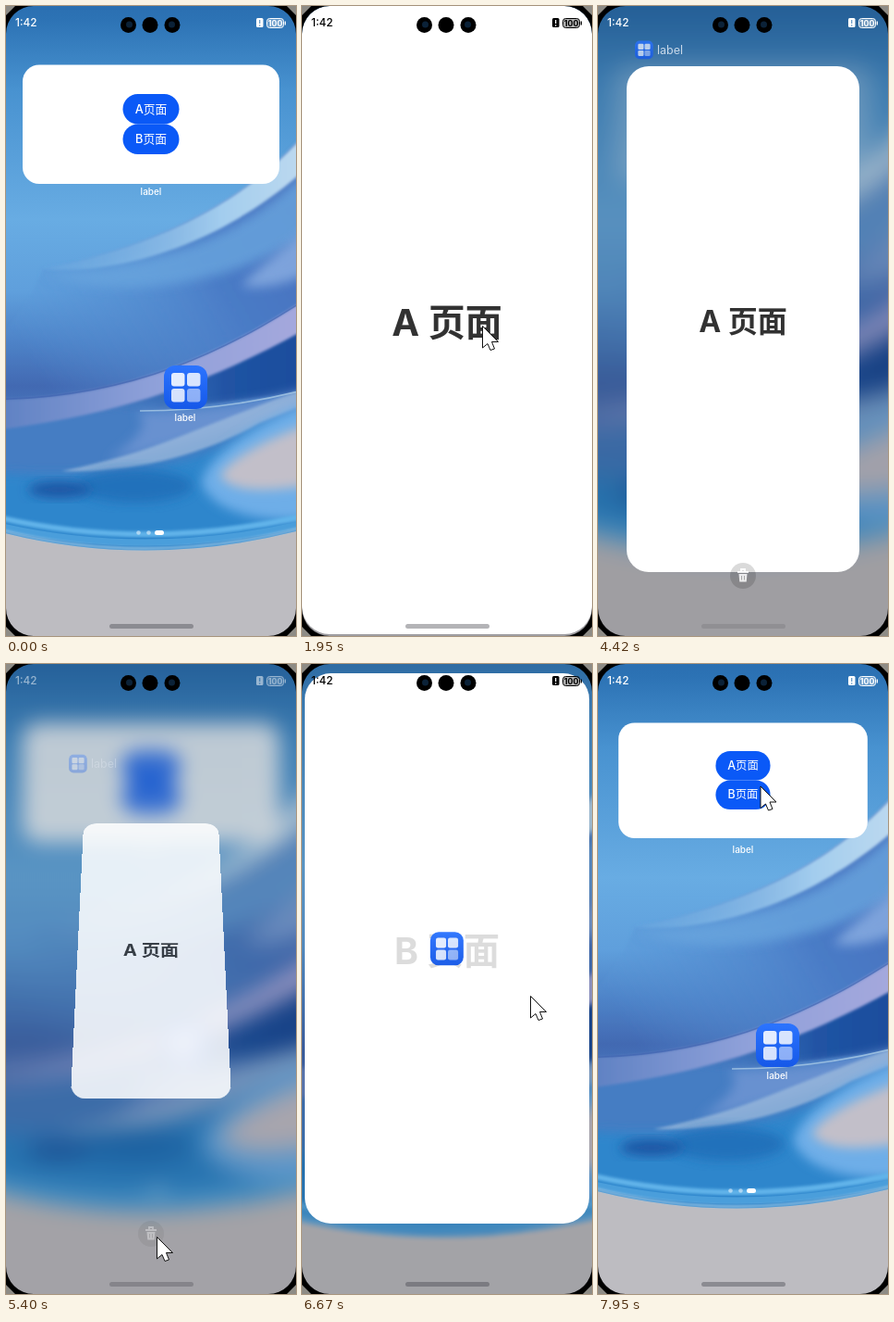
Animation of 314 by 680 pixels, one loop 8000 ms. Source, as an HTML page:

```html
<!DOCTYPE html>
<html lang="zh">
<head>
<meta charset="utf-8">
<title>Widget launch</title>
<style>
html, body { margin: 0; width: 100%; height: 100%; overflow: hidden; background: #bdbcc1; }
#stage { position: relative; width: 314px; height: 680px; overflow: hidden; }
svg { position: absolute; left: 0; top: 0; overflow: visible; }
text { font-family: Inter, "Noto Sans CJK SC", "Noto Sans CJK JP", sans-serif; }
.mid { text-anchor: middle; }
#wall { transform-origin: 157px 340px; }
#widget { transform-origin: 157px 128px; }
#page { position: absolute; background: #fff; overflow: hidden; }
#content { left: 50%; top: 50%; }
#shade { position: absolute; left: 0; top: 0; width: 100%; height: 24px; background: linear-gradient(#c4c4c8, #e3e3e5 60%, #f4f4f5); }
</style>
</head>
<body>
<div id="stage">
  <svg id="home" width="314" height="680">
    <defs>
      <linearGradient id="sky" x2="0" y2="1">
        <stop stop-color="#2565a8"/><stop offset=".08" stop-color="#2c72b4"/><stop offset=".18" stop-color="#4892d0"/>
        <stop offset=".36" stop-color="#68ace3"/><stop offset=".46" stop-color="#5f9fdc"/><stop offset=".53" stop-color="#4b7fc5"/>
        <stop offset=".59" stop-color="#3f63ae"/><stop offset=".68" stop-color="#4a82c5"/><stop offset="1" stop-color="#2d86cb"/>
      </linearGradient>
      <linearGradient id="glow" x1="1" x2="0"><stop stop-color="#c9dff0"/><stop offset=".4" stop-color="#a3cdee"/><stop offset="1" stop-color="#79b7e7" stop-opacity=".3"/></linearGradient>
      <linearGradient id="violet" x1="1" x2="0" y2=".5"><stop stop-color="#4468b6"/><stop offset=".5" stop-color="#4a7bc6"/><stop offset="1" stop-color="#5b9bda" stop-opacity=".1"/></linearGradient>
      <linearGradient id="lilac" x1="1" x2="0"><stop stop-color="#abaade"/><stop offset=".5" stop-color="#8ea0d9"/><stop offset="1" stop-color="#5279bd"/></linearGradient>
      <linearGradient id="navy" x1="1" x2="0"><stop stop-color="#184a98"/><stop offset=".5" stop-color="#2053a4"/><stop offset="1" stop-color="#4a7fc4" stop-opacity=".3"/></linearGradient>
      <linearGradient id="tile" x2="0" y2="1"><stop stop-color="#2c74ff"/><stop offset="1" stop-color="#1558e8"/></linearGradient>
      <filter id="soft" x="-20%" y="-30%" width="140%" height="160%"><feGaussianBlur stdDeviation="6"/></filter>
      <filter id="fine" x="-10%" y="-10%" width="120%" height="120%"><feGaussianBlur stdDeviation="1.5"/></filter>
      <g id="tiles">
        <rect width="47" height="47" rx="12" fill="url(#tile)"/>
        <g fill="#fff">
          <rect x="8" y="8" width="14.5" height="14.5" rx="3" opacity=".88"/><rect x="25" y="8" width="14.5" height="14.5" rx="3" opacity=".82"/>
          <rect x="8" y="25" width="14.5" height="14.5" rx="3" opacity=".82"/><rect x="25" y="25" width="14.5" height="14.5" rx="3" opacity=".5"/>
        </g>
      </g>
    </defs>
    <g id="wall">
      <rect x="-50" y="-50" width="414" height="780" fill="url(#sky)"/>
      <path d="M364 92C314 150 252 240 40 284C20 330 0 360 -50 380V430C150 420 260 370 364 300Z" fill="url(#violet)" filter="url(#fine)"/>
      <path d="M364 130C314 195 250 275 40 290C150 325 280 290 364 220Z" fill="#69a5de" opacity=".8" filter="url(#soft)"/>
      <path d="M364 92C314 150 252 240 40 284C150 292 280 235 364 135Z" fill="url(#glow)" filter="url(#fine)"/>
      <path d="M364 210C310 255 275 280 255 302C290 308 330 290 364 270Z" fill="#8fb2e4" opacity=".75" filter="url(#soft)"/>
      <path d="M364 370C250 400 150 440 -50 440V530H364Z" fill="#457dc3" filter="url(#soft)"/>
      <path d="M364 325C260 382 200 405 110 437L150 438L364 412Z" fill="url(#navy)" filter="url(#fine)"/>
      <path d="M364 290C250 370 130 432 -50 424V462C130 445 240 400 364 326Z" fill="url(#lilac)" filter="url(#fine)"/>
      <path d="M364 290C250 370 130 432 -50 424" fill="none" stroke="#3d62b0" stroke-width="1.5" opacity=".6"/>
      <path d="M-50 500C120 520 230 490 270 450L364 420V600H-50Z" fill="#2f86cc" filter="url(#soft)"/>
      <path d="M140 438C220 438 300 425 364 402V415C290 445 200 472 110 490C140 470 160 450 140 438Z" fill="#6791d0" filter="url(#soft)"/>
      <path d="M364 398C290 425 250 440 190 464C150 480 110 492 60 502C150 506 230 476 275 450L364 414Z" fill="#9dbbdd" filter="url(#fine)" opacity=".75"/>
      <path d="M145 437C220 437 300 424 364 402" fill="none" stroke="#a9cbe6" stroke-width="1.500" opacity=".8"/>
      <ellipse cx="140" cy="518" rx="62" ry="18" fill="#1d69b4" opacity=".7" filter="url(#soft)"/>
      <ellipse cx="58" cy="522" rx="34" ry="9" fill="#1b56a4" filter="url(#soft)"/>
      <path d="M364 415C270 445 212 490 212 516C228 552 290 560 364 552Z" fill="#6eaee8" filter="url(#soft)"/>
      <path d="M364 440C290 460 238 490 232 508C250 530 300 522 364 512Z" fill="#c2bfc9" filter="url(#soft)"/>
      <path d="M-50 541Q150 600 364 540" fill="none" stroke="#62b4ea" stroke-width="6" filter="url(#fine)"/>
      <path d="M-50 550Q150 609 364 548" fill="none" stroke="#4a9edb" stroke-width="7"/>
      <path d="M-40 558Q150 618 354 556V740H-40Z" fill="#bdbcc1"/>
      <path d="M-40 556Q150 616 354 554" fill="none" stroke="#9cc6e4" stroke-width="2.500" filter="url(#fine)"/>
    </g>
    <g id="widget">
      <rect x="18" y="63.500" width="278" height="128.500" rx="18" fill="#fff"/>
      <g fill="#0a59f7"><rect x="126.5" y="95" width="61" height="32.5" rx="16.2"/><rect x="126.5" y="127.500" width="61" height="32.500" rx="16.2"/></g>
      <g class="mid" font-size="12.800" font-weight="500" fill="#fff"><text x="157" y="116">A页面</text><text x="157" y="148">B页面</text></g>
    </g>
    <g class="mid" font-size="10" font-weight="500" fill="#fff"><text x="157" y="204">label</text><text x="194" y="448">label</text></g>
    <use href="#tiles" x="171" y="388"/>
    <g fill="#fff"><circle cx="143.500" cy="568.500" r="2.300" opacity=".5"/><circle cx="154.500" cy="568.500" r="2.300" opacity=".5"/><rect x="161" y="566" width="10" height="5" rx="2.5"/></g>
  </svg>

  <div id="page">
    <svg id="content" width="314" height="680">
      <text id="title" class="mid" x="157" y="357.500" font-size="40" font-weight="700" fill="#323232"></text>
      <g id="splash"><use href="#tiles" transform="translate(138.500 322)scale(.78)"/></g>
    </svg>
    <div id="shade"></div>
  </div>

  <svg id="overlay" width="314" height="680">
    <g id="header"><use href="#tiles" transform="translate(40 37.500)scale(.42)"/><text x="64" y="52" font-size="12.500" fill="#eef3fa">label</text></g>
    <g id="trash">
      <circle cx="157" cy="615" r="14" fill="#000" opacity=".18"/>
      <path d="M151 611h12M155 610v-2h4v2" stroke="#fff" stroke-width="1.800" fill="none"/>
      <path d="M152.500 613h9l-.8 8.500h-7.400Z" fill="#fff"/><path d="M155.500 615v4.500M158.500 615v4.500" stroke="#aaa"/>
    </g>
    <g id="status">
      <text x="10" y="22" font-size="11.800" font-weight="500" fill="currentColor">1:42</text>
      <rect x="271" y="13" width="7.500" height="10" rx="1.500" fill="currentColor"/>
      <path id="bang" d="M274.700 15v4M274.700 20.300v1.400" stroke-width="1.300"/>
      <rect x="282.500" y="13.500" width="18" height="10" rx="3" fill="currentColor" fill-opacity=".3" stroke="currentColor"/>
      <path d="M302.300 16.500v4" stroke="currentColor" stroke-width="1.300"/>
      <text class="mid" x="291.500" y="21.800" font-size="8.800" font-weight="700" fill="currentColor">100</text>
    </g>
    <rect id="bar" x="112" y="667" width="91" height="5" rx="2.5" fill="#3c3c42" fill-opacity=".38"/>
    <g><circle cx="132.500" cy="20.500" r="8.500"/><circle cx="156" cy="20.500" r="8.500"/><circle cx="180" cy="20.500" r="8.500"/></g>
    <g fill="#0b2238"><circle cx="133.500" cy="20" r="3.500"/><circle cx="179.500" cy="20" r="3.500"/></g>
    <path fill-rule="evenodd" d="M0 0H314V680H0ZM30 0A30 30 0 0 0 0 30V650A30 30 0 0 0 30 680H284A30 30 0 0 0 314 650V30A30 30 0 0 0 284 0Z"/>
    <path fill="#8e8c86" d="M0 0H10L0 10ZM314 0V10L304 0ZM0 680V670L10 680ZM314 680H304L314 670Z"/>
    <path id="cursor" d="M.5.5V24L6 19.500L9 26.500L13.500 25L10.500 17.500H17.500Z" fill="#fff" stroke="#111"/>
  </svg>
</div>
<script>
const LOOP = 8000;
const WIDGET = [18, 64, 296, 192], FULL = [0, 0, 314, 680], CARD = [31, 65, 283, 611], REBOUND = [22, 64, 292, 188];
const el = Object.fromEntries([...document.querySelectorAll('[id]')].map(e => [e.id, e]));

const ramp = (v, a, b) => Math.min(1, Math.max(0, (v - a) / (b - a)));
const easeOut = p => 1 - (1 - p) ** 3;
const smooth = p => p * p * (3 - 2 * p);
const mix = (a, b, p) => a + (b - a) * p;
const mixRect = (a, b, p) => a.map((v, i) => mix(v, b[i], p));

// Each pointer visit is a list of [time, x, y].
const VISITS = [
  [[150, 15, 455], [900, 157, 115], [1120, 157, 113], [1400, 157, 113], [1950, 195, 345], [2100, 182, 414], [2620, 320, 530]],
  [[4600, 320, 560], [5100, 163, 618], [5420, 163, 618], [6070, 268, 408], [6150, 130, 64], [6230, 150, 140],
   [6370, 150, 140], [6670, 247, 358], [6900, 320, 470]],
  [[7590, 320, 300], [7930, 175.5, 131.5], [LOOP, 175.5, 131.5]]
];

function placeCursor(t) {
  const visit = VISITS.find(v => t >= v[0][0] && t < v.at(-1)[0]);
  el.cursor.style.display = visit ? '' : 'none';
  if (!visit) return;
  const i = visit.findIndex(k => k[0] > t);
  const [t0, x0, y0] = visit[i - 1], [t1, x1, y1] = visit[i];
  const p = smooth(ramp(t, t0, t1));
  el.cursor.setAttribute('transform', `translate(${mix(x0, x1, p)} ${mix(y0, y1, p)})`);
}

function pageRect(open, recents, lift, close) {
  const opened = mixRect(WIDGET, FULL, open);
  const [l, top, r] = mixRect(opened, CARD, recents);
  // The bottom edge leads while the page is swiped up.
  return mixRect([l, top, r, mix(opened[3], CARD[3], lift)], REBOUND, close);
}

function render(t) {
  const second = t > 6200;
  const open = easeOut(second ? ramp(t, 6310, 7090) : ramp(t, 1290, 2070));
  const recents = second ? 0 : smooth(ramp(t, 3490, 4340));
  const lift = second ? 0 : easeOut(ramp(t, 3565, 4340));
  const gone = second ? 0 : easeOut(ramp(t, 5260, 5800));
  const close = easeOut(ramp(t, 7540, 7900));
  const back = second ? ramp(t, 7560, 7880) : smooth(ramp(t, 5200, 6040));

  const blur = mix(3 * open, 13, recents) * (1 - back);
  const zoom = 1 + mix(.15 * open, .02, recents) * (1 - back);
  const dim = 1 - .16 * open * (1 - back);
  el.home.style.filter = blur > .05 ? `blur(${blur}px) brightness(${dim})` : 'none';
  el.wall.style.transform = `scale(${zoom})`;
  el.widget.style.opacity = mix(mix(1, .25, recents), 1, ramp(gone, 0, .8));
  el.widget.style.transform = close > .8 ? 'translateY(-2px) scale(.97)' : 'none';

  const [l, top, r, b] = pageRect(open, recents, lift, close);
  const radius = mix(mix(18, 30, open), second ? 18 : 24, second ? close : recents);
  const alpha = ramp(open, 0, .2) * (1 - ramp(gone, .53, 1)) * (1 - ramp(close, .85, 1));
  Object.assign(el.page.style, {
    left: l + 'px', top: top + 'px', width: r - l + 'px', height: b - top + 'px',
    borderRadius: radius + 'px', opacity: alpha, display: alpha ? '' : 'none',
    transform: gone ? `translateY(${-51 * gone}px) perspective(1000px) rotateX(${52 * gone}deg) scale(${1 - .62 * gone})` : 'none'
  });
  el.content.style.transform = `translate(-50%, -50%) scale(${(r - l) / 314})`;
  el.title.textContent = second ? 'B 页面' : 'A 页面';
  el.title.style.opacity = ramp(open, .82, .97) * (1 - ramp(close, .3, .8));
  el.splash.style.opacity = 1 - ramp(open, .84, .97);
  el.shade.style.opacity = t > 3550 && t < 3850 ? 1 - ramp(t, 3600, 3850) : 0;

  const tools = second ? 0 : ramp(t, 4100, 4500) * Math.max(0, 1 - 1.15 * gone);
  el.header.style.opacity = el.trash.style.opacity = tools;
  el.header.setAttribute('transform', `translate(${47 * gone} ${101 * gone})`);

  const onPage = (t > 1500 && t < 3550) || (t > 6500 && t < 7620);
  el.status.style.color = onPage ? '#000' : '#fff';
  el.status.style.opacity = 1 - .5 * Math.sin(Math.PI * gone);
  el.bang.style.stroke = onPage ? '#fff' : '#6a9cc8';
  el.bar.style.opacity = 1 - .6 * recents * (1 - gone);
  placeCursor(t);
}

const start = performance.now();
function tick() {
  render((performance.now() - start) % LOOP);
  requestAnimationFrame(tick);
}
tick();
</script>
</body>
</html>
```
